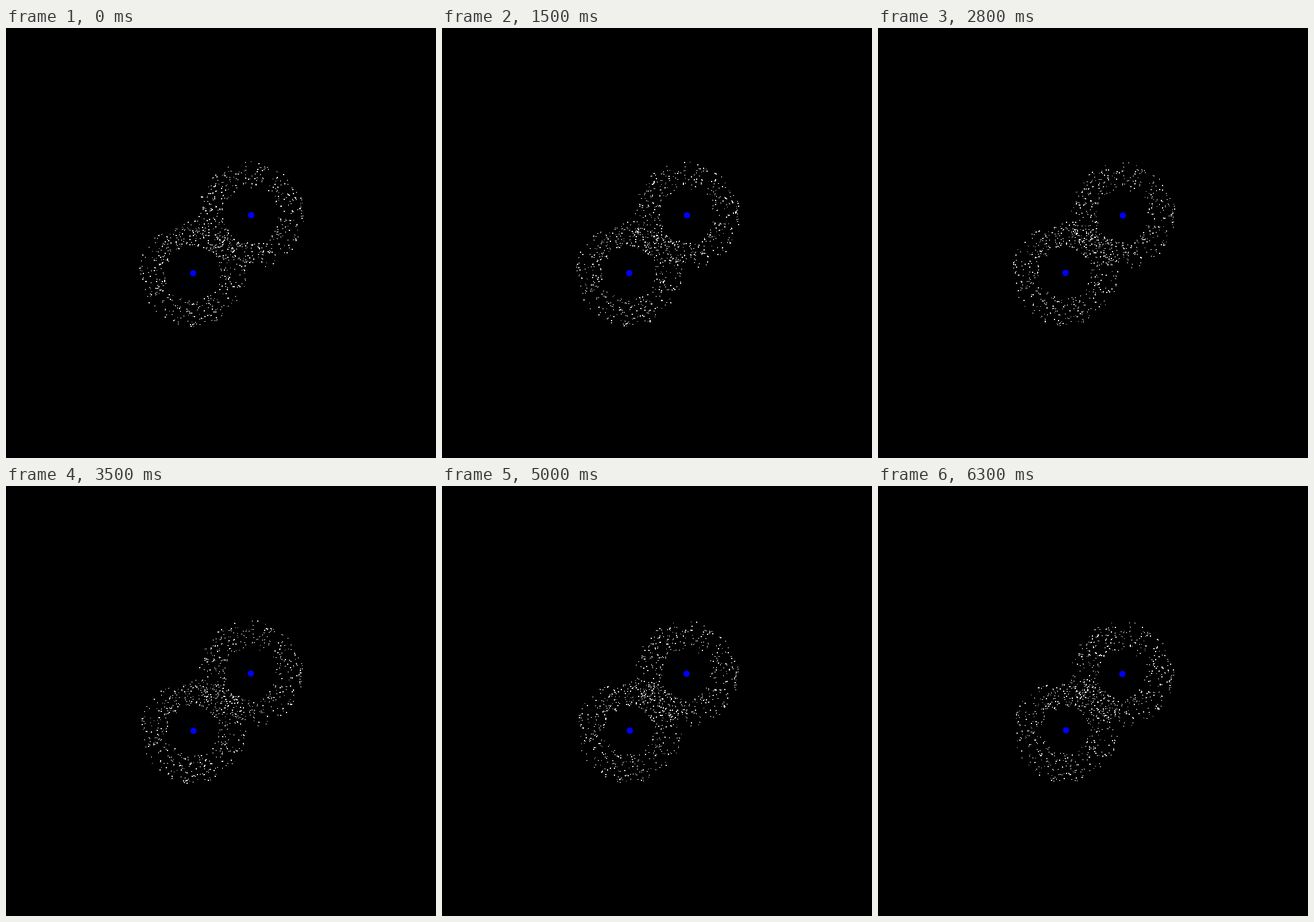
Animation, 748 px wide and 748 px high, one loop 6400 ms. Source, as an HTML page with a canvas:

```html
<!DOCTYPE html>
<html>
<head>
<meta charset="utf-8">
<style>
  html, body { margin: 0; background: #000; overflow: hidden; }
  canvas { display: block; }
</style>
</head>
<body>
<canvas id="stage" width="748" height="748"></canvas>
<script>
const ctx = document.getElementById('stage').getContext('2d');
const LOOP = 6400, STEP = 100;
const STARS = 430, INNER = 47.5, OUTER = 93, DOT = 1.5;

// Seeded generator, so every run shows the same stars
let seed = 20;
function random() {
  seed = (seed * 1664525 + 1013904223) % 4294967296;
  return seed / 4294967296;
}

function makeGalaxy(x, y, pull) {
  const stars = Array.from({ length: STARS }, () => ({
    radius: INNER + (OUTER - INNER) * random(),
    angle: 2 * Math.PI * random()
  }));
  return { x, y, pull, stars };
}

const galaxies = [
  makeGalaxy(426.5, 325.5, -1),
  makeGalaxy(325.5, 426.5, 1)
];

// Hard-edged dot: both edges snap to whole pixels
function drawDot(x, y) {
  const left = Math.round(x - DOT / 2), top = Math.round(y - DOT / 2);
  ctx.fillRect(left, top,
               Math.round(x + DOT / 2) - left, Math.round(y + DOT / 2) - top);
}

function drawGalaxy({ x, y, pull, stars }, t) {
  // The two centres fall slowly towards each other
  const fall = pull * (0.12 * t + 0.02 * t * t);
  const cx = x + fall, cy = y - fall;

  ctx.fillStyle = '#fff';
  for (const { radius, angle } of stars) {
    // Kepler rotation with a slow inward drift
    const a = angle + 0.0388 * (OUTER / radius) ** 1.5 * t;
    const r = radius - 1.2 * (INNER / radius) ** 2 * t;
    drawDot(cx + r * Math.cos(a), cy + r * Math.sin(a));
  }

  ctx.fillStyle = '#00f';
  ctx.beginPath();
  ctx.arc(cx, cy, 5.5, 0, 2 * Math.PI);
  ctx.fill();
}

function draw() {
  const t = Math.floor(performance.now() % LOOP / STEP) * STEP / 1000;
  ctx.fillStyle = '#000';
  ctx.fillRect(0, 0, 748, 748);
  galaxies.forEach(galaxy => drawGalaxy(galaxy, t));
  requestAnimationFrame(draw);
}
draw();
</script>
</body>
</html>
```
